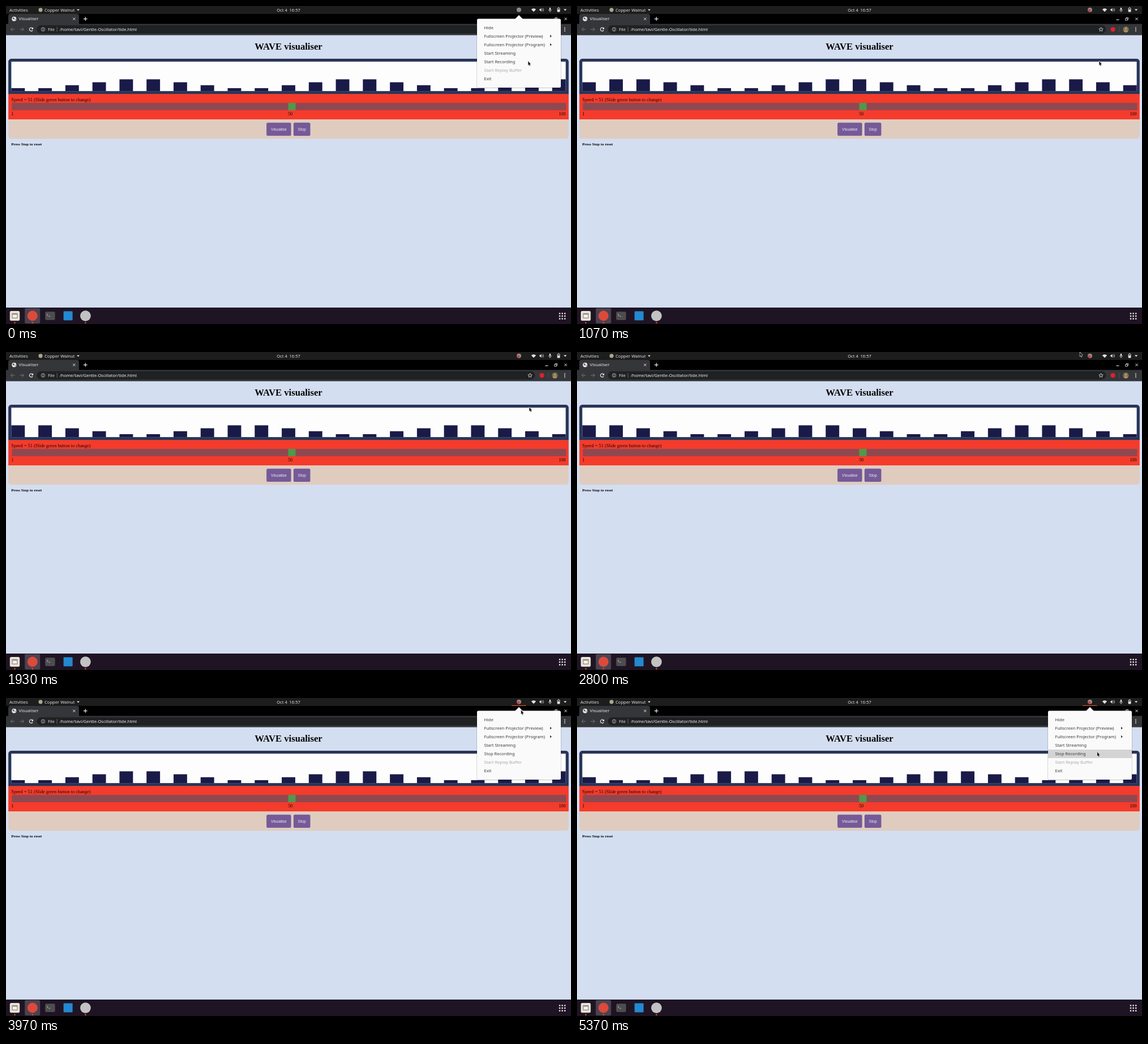
Recreate the animation shown at these times as an HTML page with a canvas. Size 998 by 561 pixels, loop 5410 ms.

```html
<!DOCTYPE html>
<html lang="en">
<head>
<meta charset="utf-8">
<title>Visualiser</title>
<style>
html, body { margin: 0; width: 100%; height: 100%; overflow: hidden; background: #d3def1; }
canvas { display: block; width: 998px; height: 561px; }
</style>
</head>
<body>
<canvas id="stage" width="998" height="561"></canvas>
<script>
const ctx = document.getElementById('stage').getContext('2d');
const LOOP = 5410;
const SANS = '"Noto Sans", "Open Sans", sans-serif';
const SERIF = '"Liberation Serif", "Times New Roman", serif';
const ARIAL = '"Liberation Sans", Arial, sans-serif';
ctx.fontKerning = 'normal';

// Wave: bars take their height from a repeating ramp that shifts left
const RAMP = [1, 1, 2, 3, 4, 4, 3, 2];
const STEP = 98.2, LEAD = 42;

const MENU = ['Hide', 'Fullscreen Projector (Preview)', 'Fullscreen Projector (Program)',
  'Start Streaming', 'Start Recording', 'Start Replay Buffer', 'Exit'];
const ROW = 15, ROW_TOP = 31;

// Pointer path: time, x, y
const PATH = [
  [0, 922, 97], [1250, 922, 97], [1750, 924, 97], [1980, 924, 97],
  [2270, 918, 66], [2500, 904, 22], [2700, 888, 0], [2900, 888, 0],
  [3300, 905, 4], [3550, 907, 8], [3800, 909.5, 21], [4220, 909.5, 21],
  [4570, 915, 66], [4720, 918.6, 90], [5130, 918.6, 90], [5240, 918.6, 95], [LOOP, 918.6, 95]
];

const clamp = v => Math.max(0, Math.min(1, v));

function pointerAt(t) {
  let i = 1;
  while (i < PATH.length - 1 && PATH[i][0] < t) i++;
  const a = PATH[i - 1], b = PATH[i];
  const k = clamp((t - a[0]) / (b[0] - a[0]));
  return { x: a[1] + (b[1] - a[1]) * k, y: a[2] + (b[2] - a[2]) * k };
}

function rect(x, y, w, h, color) {
  ctx.fillStyle = color;
  ctx.fillRect(x, y, w, h);
}

function round(x, y, w, h, r, color) {
  ctx.fillStyle = color;
  ctx.beginPath();
  ctx.roundRect(x, y, w, h, r);
  ctx.fill();
}

function disc(x, y, r, color) {
  ctx.fillStyle = color;
  ctx.beginPath();
  ctx.arc(x, y, r, 0, Math.PI * 2);
  ctx.fill();
}

function ring(x, y, r, color, width = 0.9, from = 0, to = Math.PI * 2) {
  ctx.strokeStyle = color;
  ctx.lineWidth = width;
  ctx.beginPath();
  ctx.arc(x, y, r, from, to);
  ctx.stroke();
}

function trace(points) {
  ctx.beginPath();
  for (let i = 0; i < points.length; i += 2) ctx.lineTo(points[i], points[i + 1]);
}

function poly(points, color) {
  trace(points);
  ctx.fillStyle = color;
  ctx.fill();
}

function line(points, color, width = 1) {
  trace(points);
  ctx.strokeStyle = color;
  ctx.lineWidth = width;
  ctx.stroke();
}

function text(str, x, y, size, family, color, align = 'left', weight = '') {
  ctx.font = `${weight} ${size}px ${family}`;
  ctx.textAlign = align;
  ctx.fillStyle = color;
  ctx.fillText(str, x, y);
}

function cross(x, y, r, color) {
  line([x - r, y - r, x + r, y + r], color);
  line([x - r, y + r, x + r, y - r], color);
}

function topBar(recording, open) {
  const ink = '#e2e2e2';
  rect(0, 0, 998, 14, '#1d1d1d');
  text('Activities', 6, 9.7, 7.85, SANS, ink);
  disc(61, 6.8, 3.6, '#aca58f');
  text('Copper Walnut', 68, 9.7, 7.6, SANS, ink);
  poly([125, 5.7, 130, 5.7, 127.5, 8.5], ink);
  text('Oct 4  16:57', 499, 9.7, 7.5, SANS, ink, 'center');

  disc(906, 6.7, 4, '#8c8c8c');
  if (recording) disc(905, 8, 2.3, '#d9363d');
  if (open > 0) {
    ctx.globalAlpha = open;
    rect(893, 12.8, 25.5, 1.2, '#d9512f');
    ctx.globalAlpha = 1;
  }

  ctx.fillStyle = ink;
  ctx.beginPath();
  ctx.moveTo(932, 10.2);
  ctx.arc(932, 10.2, 5.9, -Math.PI * 0.75, -Math.PI * 0.25);
  ctx.fill();

  poly([942.3, 5.5, 943.7, 5.5, 945.6, 3.4, 945.6, 10.2, 943.7, 8.1, 942.3, 8.1], ink);
  ring(945.5, 6.8, 2.3, ink, 0.7, -0.9, 0.9);
  ring(945.5, 6.8, 4.1, ink, 0.7, -0.9, 0.9);

  round(959.8, 2.7, 2.4, 4.8, 1.2, ink);
  ring(961, 6.3, 2.6, ink, 0.7, 0, Math.PI);
  line([961, 9, 961, 10.8], ink, 0.8);

  round(973.7, 3.4, 4.8, 7.2, 0.8, ink);
  rect(975, 2.5, 2.2, 1, ink);
  rect(974.6, 4.3, 3, 1.7, '#1d1d1d');
  poly([985, 5.5, 990.4, 5.5, 987.7, 8.5], ink);
}

function browser() {
  const ink = '#eeeeee', dim = '#77787b';
  rect(0, 14, 998, 18, '#000');
  round(4, 14, 125, 20, [4, 4, 0, 0], '#353639');
  rect(0, 31.6, 998, 19.8, '#353639');

  disc(14.3, 22.7, 4, ink);
  poly([11.5, 21, 14, 20, 15, 22, 13, 24.2], '#55565a');
  poly([15.5, 23, 17.5, 22.4, 16, 25.4], '#55565a');
  text('Visualiser', 22.5, 25.4, 7.8, SANS, '#e6e6e6');
  cross(120.3, 22.7, 2, ink);
  line([136.8, 22.7, 143.6, 22.7], ink, 1.2);
  line([140.2, 19.3, 140.2, 26.1], ink, 1.2);

  line([952.5, 24.3, 957.5, 24.3], ink, 1.1);
  ctx.strokeStyle = ink;
  ctx.lineWidth = 0.8;
  ctx.strokeRect(968.8, 22, 3.4, 3.2);
  line([970.2, 22, 970.2, 20.3, 973.6, 20.3, 973.6, 23.7, 972.2, 23.7], ink, 0.8);
  cross(988.6, 22.7, 2.1, ink);

  line([15.4, 41.2, 8.4, 41.2], dim);
  line([11.6, 38, 8.4, 41.2, 11.6, 44.4], dim);
  line([24.4, 41.2, 31.4, 41.2], dim);
  line([28.2, 38, 31.4, 41.2, 28.2, 44.4], dim);
  ring(44.5, 41.2, 3, ink, 1.1, 0.5, 5.5);
  poly([48, 37.4, 48, 41, 44.6, 41], ink);

  round(54.5, 34, 880, 14.4, 7.2, '#202123');
  ring(65.5, 41.2, 3.2, '#d5d5d5', 0.8);
  line([65.5, 40.6, 65.5, 43.2], '#d5d5d5', 0.9);
  rect(65, 38.9, 1, 0.9, '#d5d5d5');
  text('File', 74, 44, 7.5, SANS, '#e0e0e0');
  rect(89.7, 37, 0.8, 8.5, '#777');
  text('/home/tavi/Gentle-Oscillator/tide.html', 95, 44, 7.55, SANS, '#f1f1f1');

  const star = [];
  for (let i = 0; i <= 10; i++) {
    const a = -Math.PI / 2 + i * Math.PI / 5, r = i % 2 ? 1.7 : 3.9;
    star.push(925.6 + r * Math.cos(a), 41.4 + r * Math.sin(a));
  }
  line(star, '#dedede', 0.8);
  disc(946.6, 41.2, 4, '#e3202b');
  rect(957.6, 36.5, 0.7, 9.5, '#56575a');

  ctx.save();
  ctx.beginPath();
  ctx.arc(969.5, 41.2, 5.2, 0, Math.PI * 2);
  ctx.clip();
  rect(964, 36, 11, 11, '#6d7448');
  disc(969.5, 40, 2.3, '#b58a6a');
  disc(969.5, 46.5, 4.1, '#b58a6a');
  ctx.restore();

  for (let i = 0; i < 3; i++) disc(987, 38.4 + i * 2.8, 0.9, ink);
}

function button(label, x, w, edge) {
  round(x, 396, w, 45, 5, edge);
  round(x + 1, 397, w - 2, 43, 4, '#755a98');
  text(label, x + w / 2, 423, 13.333, ARIAL, '#efeaf5', 'center');
}

// The page is laid out in CSS pixels of a 1920 x 1080 screen
function page(t) {
  ctx.save();
  ctx.scale(998 / 1920, 561 / 1080);
  rect(0, 99, 1920, 926, '#d3def1');
  text('WAVE visualiser', 960, 149, 32, SERIF, '#050505', 'center', 'bold');

  round(8, 179, 1904, 121, [10, 10, 0, 0], '#293457');
  rect(18, 189, 1884, 100, '#fdfdfd');
  const shift = Math.floor((t + LEAD) / STEP), cell = 1884 / 41;
  for (let i = 0; i < 21; i++) {
    const h = RAMP[(i + shift) % 8] * 10;
    rect(18 + i * 2 * cell, 289 - h, cell, h, '#1a1a49');
  }

  rect(8, 299, 1904, 87, '#f53b2b');
  text('Speed = 51 (Slide green button to change)', 18, 323, 16, SERIF, '#1a0806');
  rect(20, 329, 1884, 25, '#904850');
  rect(959, 329, 25, 25, '#4f994b');
  text('1', 18, 372, 16, SERIF, '#1a0806');
  text('50', 958, 372, 16, SERIF, '#1a0806');
  text('100', 1902, 372, 16, SERIF, '#1a0806', 'right');

  round(8, 385, 1904, 66, [0, 0, 10, 10], '#dfccbf');
  button('Visualise', 885, 84, '#8872b4');
  button('Stop', 977, 57, '#755a98');
  text('Press Stop to reset', 18, 473, 13.28, SERIF, '#050505', 'left', 'bold');
  ctx.restore();
}

function dock() {
  rect(0, 532, 998, 29, '#1f1423');
  round(33.2, 533, 27, 27, 2, '#4b424f');

  round(6.8, 538, 17.4, 17.2, 2.5, '#e8e2d8');
  round(10.4, 542, 10.2, 9, 1, '#8d8782');
  rect(11.6, 544.4, 7.8, 5.4, '#f3eee7');

  disc(46.8, 546.5, 9, '#dc4a3c');
  round(69.2, 539.3, 17.4, 14.6, 2, '#4d4d4f');
  line([72, 543, 74.2, 545, 72, 547], '#d0d0d0', 0.8);
  line([75.2, 547.4, 78, 547.4], '#d0d0d0', 0.8);
  round(101.6, 538.6, 16, 16, 1, '#2389d0');
  disc(140.4, 546.6, 9.4, '#c2c2c2');

  for (const x of [15.5, 46.8, 140.4]) disc(x, 558.7, 1.3, '#e2552c');
  for (let i = 0; i < 9; i++) {
    round(976.8 + (i % 3) * 4.6, 541.2 + Math.floor(i / 3) * 4.6, 2.5, 2.5, 0.6, '#e6e6e6');
  }
}

function menu(alpha, t, pointer) {
  if (alpha <= 0) return;
  ctx.save();
  ctx.globalAlpha = alpha;
  round(831.5, 22.1, 149, 122.6, 3, 'rgba(0, 0, 0, 0.3)');
  round(832, 22.6, 148, 121.4, 2.6, '#fafafa');
  poly([899, 23, 906, 16, 913, 23], '#fafafa');

  const late = t > 3000;
  const hover = late ? Math.floor((pointer.y - ROW_TOP) / ROW) : -1;
  if (hover >= 0) {
    const pressed = hover === 4 && t > 5270;
    rect(832, ROW_TOP + hover * ROW, 148, ROW, pressed ? '#d4d4d4' : '#e7e7e7');
  }
  MENU.forEach((name, i) => {
    const label = late && i === 4 ? 'Stop Recording' : name;
    text(label, 844.5, 41 + i * ROW, 7.55, SANS, i === 5 ? '#a9a9a9' : '#3b3b3b');
  });
  for (const y of [53.2, 68.2]) poly([961, y - 2.4, 964, y, 961, y + 2.4], '#3b3b3b');
  ctx.restore();
}

function drawPointer({ x, y }) {
  ctx.save();
  ctx.translate(x + 0.3, y + 0.3);
  ctx.scale(0.82, 0.85);
  trace([0, 0, 0, 8.6, 1.9, 7, 3.2, 9.9, 4.6, 9.2, 3.4, 6.4, 5.7, 6.2]);
  ctx.closePath();
  ctx.lineJoin = 'round';
  ctx.strokeStyle = '#f2f2f2';
  ctx.lineWidth = 1.3;
  ctx.stroke();
  ctx.fillStyle = '#1c1c1c';
  ctx.fill();
  ctx.restore();
}

function draw(t) {
  const pointer = pointerAt(t);
  const open = clamp((t - 3570) / 100);
  const closing = clamp(1 - (t - 40) / 100);
  page(t);
  browser();
  topBar(t > 330, open);
  dock();
  menu(Math.max(open, closing), t, pointer);
  drawPointer(pointer);
}

const start = performance.now();
function tick(now) {
  draw(Math.max(0, now - start) % LOOP);
  requestAnimationFrame(tick);
}
draw(0);
requestAnimationFrame(tick);
</script>
</body>
</html>
```
